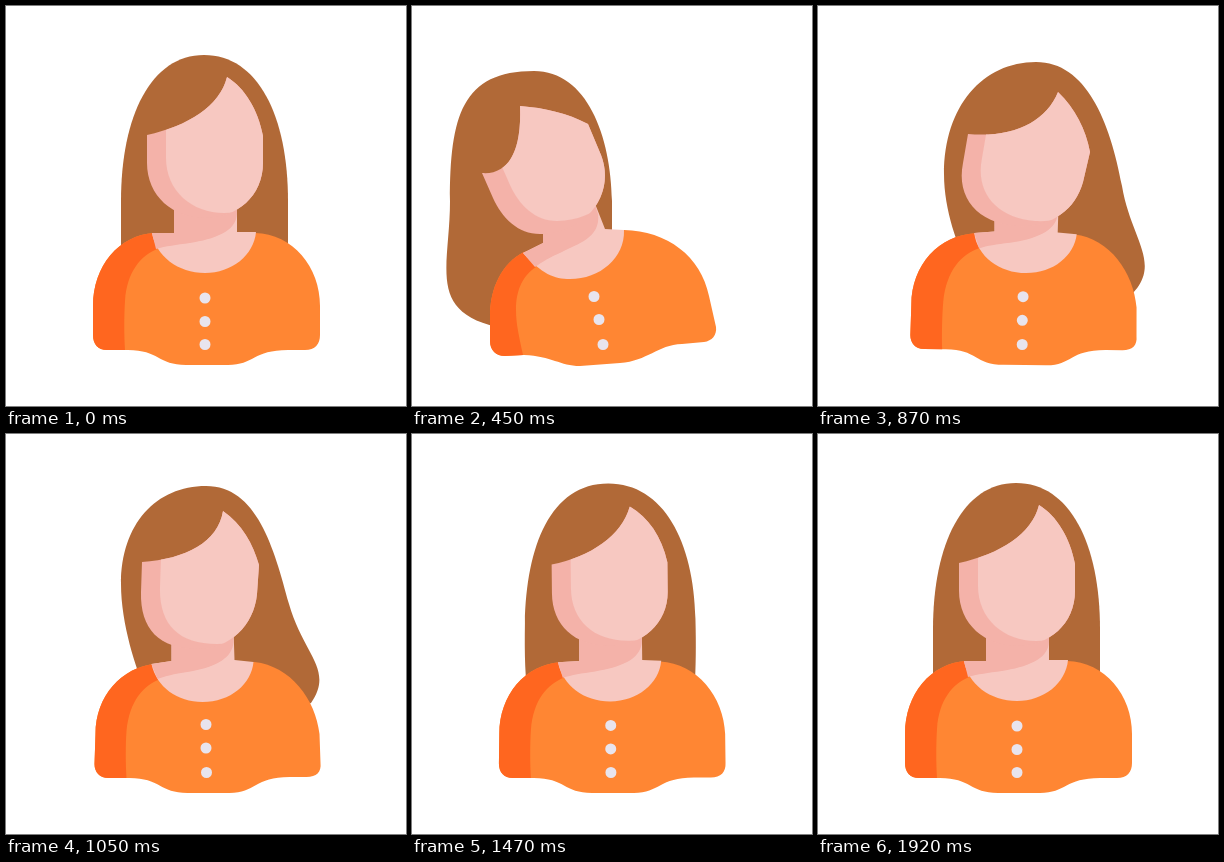
These frames come from a looping animation (400 by 400 pixels, 1950 ms). An HTML page:

```html
<!DOCTYPE html>
<html lang="en">
<head>
<meta charset="utf-8">
<title>Swaying avatar</title>
<style>
  html, body { margin: 0; width: 100%; height: 100%; overflow: hidden; background: #fff; }
  svg { display: block; width: 100vw; height: 100vh; }
  .hair { fill: #b16937; }
  .shirt { fill: #ff8633; }
  .fold { fill: #ff661f; }
  .skin { fill: #f7c8c1; }
  .shadow { fill: #f4b2a9; }
  .buttons { stroke: #e8e4ee; stroke-width: 11; stroke-linecap: round; fill: none; }
</style>
</head>
<body>
<svg viewBox="0 0 400 400">
  <clipPath id="faceClip"><path id="clip"/></clipPath>
  <path id="hair" class="hair"/>
  <g id="torso">
    <path id="shirt" class="shirt"/>
    <path id="fold" class="fold"/>
    <path id="buttons" class="buttons"/>
  </g>
  <g id="throat">
    <path id="neck" class="skin"/>
    <path id="chin" class="shadow"/>
  </g>
  <path id="face" class="shadow"/>
  <path id="light" class="skin" clip-path="url(#faceClip)"/>
</svg>
<script>
const LOOP = 1950, STEP = 30;
const $ = id => document.getElementById(id);
const nums = s => String(s).match(/-?[\d.]+/g).map(Number);
const fill = (shape, v) => { let i = 0; return shape.replace(/-?[\d.]+/g, () => v[i++].toFixed(2)); };

// Smooth curve through key values that never overshoots them.
function track(keys) {
  const ts = keys.map(k => k[0]), vs = keys.map(k => nums(k[1]));
  const slope = (i, c) => (vs[i + 1][c] - vs[i][c]) / (ts[i + 1] - ts[i]);
  const tangent = (i, c) => {
    if (i === 0 || i === ts.length - 1) return 0;
    const a = slope(i - 1, c), b = slope(i, c);
    return a * b <= 0 ? 0 : 2 * a * b / (a + b);
  };
  return t => {
    let i = 0;
    while (i < ts.length - 2 && t >= ts[i + 1]) i++;
    const h = ts[i + 1] - ts[i], u = Math.min(1, (t - ts[i]) / h);
    const u2 = u * u, u3 = u2 * u;
    return vs[i].map((a, c) =>
      a * (2 * u3 - 3 * u2 + 1) + vs[i + 1][c] * (3 * u2 - 2 * u3) +
      h * (tangent(i, c) * (u3 - 2 * u2 + u) + tangent(i + 1, c) * (u3 - u2)));
  };
}

const hairRest = 'M115 262C115 250 115 220 115 195C115 110 145 49 198 49C252 49 282 110 282 195C282 220 282 250 282 262L200 300Z';
const hairLeft = 'M85 321C15 305 38 260 38 195C38 110 50 65 122 65C175 65 199 130 200 195C200 210 200 225 200 250L200 290Z';
const hair = track([
  [0, hairRest],
  [450, hairLeft],
  [510, hairLeft],
  [690, 'M117 262C117 250 118 220 118 190C117 104 134 52 204 52C258 52 278 115 278 195C278 210 277 230 276 262L200 300Z'],
  [870, 'M150 262C140 240 126 205 126 168C126 100 165 56 218 56C268 56 292 115 304 180C314 240 352 262 300 300L200 300Z'],
  [1050, 'M140 258C130 235 115 190 115 150C115 90 150 52 200 52C251 52 268 114 283 170C298 222 328 235 305 269L200 300Z'],
  [1290, 'M95 272C82 260 85 225 87 200C90 118 117 51 180 51C238 51 259 100 259 155C259 190 255 215 250 245L200 300Z'],
  [1560, 'M124 262C124 240 122 220 122 185C123 110 146 49 202 49C256 49 290 110 292 195C293 220 294 235 294 262L200 300Z'],
  [1680, 'M122 262C122 240 120 220 120 185C122 110 145 49 201 49C255 49 288 110 289 195C290 220 291 235 291 262L200 300Z'],
  [1920, hairRest]
]);

const faceRest = 'M141 129C182 120 214 100 221 71C239 82 252 104 257 130L257 157C257 190 231 212 199 212C167 212 141 190 141 157Z';
const faceLeft = 'M70 167C95 169 110 148 108 100C133 102 155 107 176 118L189 149C204 187 175 228 128 228C106 228 90 212 81 192Z';
const face = track([
  [0, faceRest],
  [435, faceLeft],
  [510, faceLeft],
  [690, 'M138 141C178 131 205 108 224 80C236 92 246 108 253 124L258 160C259 192 235 214 205 214C160 216 144 200 141 162Z'],
  [870, 'M150 128C195 132 228 116 240 86C257 102 268 124 272 146L265 176C257 205 232 222 198 220C160 217 138 192 145 157Z'],
  [1050, 'M136 128C180 125 212 108 217 77C236 90 247 110 253 131L251 160C248 192 223 215 192 215C153 215 134 195 135 158Z'],
  [1290, 'M130 138C168 129 196 108 200 71C221 82 237 98 245 120L249 158C251 188 226 211 197 211C153 214 137 199 134 165Z'],
  [1560, 'M143 128C183 120 214 100 224 73C242 84 254 104 259 131L258 158C257 190 231 212 199 212C167 212 141 190 142 157Z'],
  [1680, 'M142 128C182 120 214 100 223 72C241 83 253 104 258 130L257 158C257 190 231 212 199 212C167 212 141 190 141 157Z'],
  [1920, faceRest]
]);

// Each torso part: upright pose, pose leaning left, pose with dropped shoulders.
const parts = {
  shirt: [
    'M148 227C113 229 87 260 87 300L87 329C87 338 92 344 101 344L122 344C153 344 152 359 180 359L222 359C248 359 247 344 282 344L299 344C309 344 314 338 314 329L314 300C314 261 287 228 249 227Z',
    'M112 246C90 257 78 282 78 310L78 335C78 344 84 350 93 350L112 349C140 350 148 360 168 360L208 357C236 355 245 339 270 338L292 336C300 335 305 329 304 321L297 290C289 250 255 225 212 224Z',
    'M148 230C114 233 88 262 88 300L87 330C87 338 92 344 101 344L122 344C153 344 152 359 180 359L222 359C248 359 247 343 282 343L299 343C309 343 314 338 313 329L312 300C308 265 283 232 247 228Z'],
  fold: [
    'M148 227C113 229 87 260 87 300L87 329C87 338 92 344 101 344L119 344C118 330 118 310 119 295C121 265 135 250 151 243Z',
    'M112 246C90 257 78 282 78 310L78 335C78 344 84 350 93 350L111 349C107 330 104 318 104 304C104 282 112 269 124 261Z',
    'M148 230C114 233 88 262 88 300L87 330C87 338 92 344 101 344L119 344C118 330 118 310 119 297C122 267 136 251 153 245Z'],
  buttons: [
    'M199 292L199 292M199 315.5L199 315.5M199 338.5L199 338.5',
    'M182 290.5L182 290.5M187 313.5L187 313.5M191 338.5L191 338.5',
    'M198.5 290.5L198.5 290.5M198.5 314L198.5 314M199 338.5L199 338.5'],
  neck: [
    'M146 227L168 227L168 195L231 195L231 226L250 226C248 249 226 267 199 267C172 267 150 250 146 227Z',
    'M111 247L131 237L131 215L180 190L193 223L212 224C213 252 188 273 158 273C142 273 130 268 111 247Z',
    'M148 230L168 227L168 195L230 195L231 226L250 228C248 250 227 268 199 268C174 268 153 253 148 230Z'],
  chin: [
    'M168 195L231 195L231 208C230 226 208 233 184 237C170 239 160 240 150 243L146 227L168 227Z',
    'M131 215L180 190L186 208C189 232 165 238 150 246C138 251 130 256 123 261L111 247L131 237Z',
    'M168 195L230 195L230 208C229 226 208 234 184 238C170 240 162 242 154 245L148 230L168 227Z']
};
const shapes = Object.entries(parts).map(([id, poses]) => ({ id, path: poses[0], poses: poses.map(nums) }));

// Lean amount, shoulder drop, torso shift, neck shift.
const sway = track([
  [0, '0 0 0 0'], [435, '1 0 0 0'], [510, '1 0 0 0'], [690, '0.08 1 4.5 6.5'], [870, '-0.15 1 4 3'],
  [1050, '0 1 1.5 -2.5'], [1290, '0 1 -0.3 -3'], [1560, '0 0.1 0 0'], [1680, '0 0 0 0'], [1920, '0 0 0 0']
]);

// Lit side of the face: its lower outline pushed right and up, cut off by the face itself.
function lightPath(v, lean) {
  const ox = 19 - 2 * lean, oy = -5 - 8 * lean;
  const p = i => `${v[2 * i]} ${v[2 * i + 1]} `;
  const q = i => `${v[2 * i] + ox} ${v[2 * i + 1] + oy} `;
  return `M${q(0)}L${p(3)}L${q(3)}L${q(6)}L${q(7)}C${q(8)}${q(9)}${q(10)}C${q(11)}${q(12)}${q(13)}Z`;
}

function draw() {
  const t = Math.floor(performance.now() % LOOP / STEP) * STEP;
  const [lean, drop, torsoX, neckX] = sway(t);
  const f = face(t), outline = fill(faceRest, f);
  $('hair').setAttribute('d', fill(hairRest, hair(t)));
  $('face').setAttribute('d', outline);
  $('clip').setAttribute('d', outline);
  $('light').setAttribute('d', lightPath(f, Math.max(0, lean)));
  for (const { id, path, poses: [up, left, low] } of shapes)
    $(id).setAttribute('d', fill(path, up.map((x, i) => x + (left[i] - x) * lean + (low[i] - x) * drop)));
  $('torso').setAttribute('transform', `translate(${torsoX} 0)`);
  $('throat').setAttribute('transform', `translate(${neckX} 0)`);
  requestAnimationFrame(draw);
}
draw();
</script>
</body>
</html>
```
